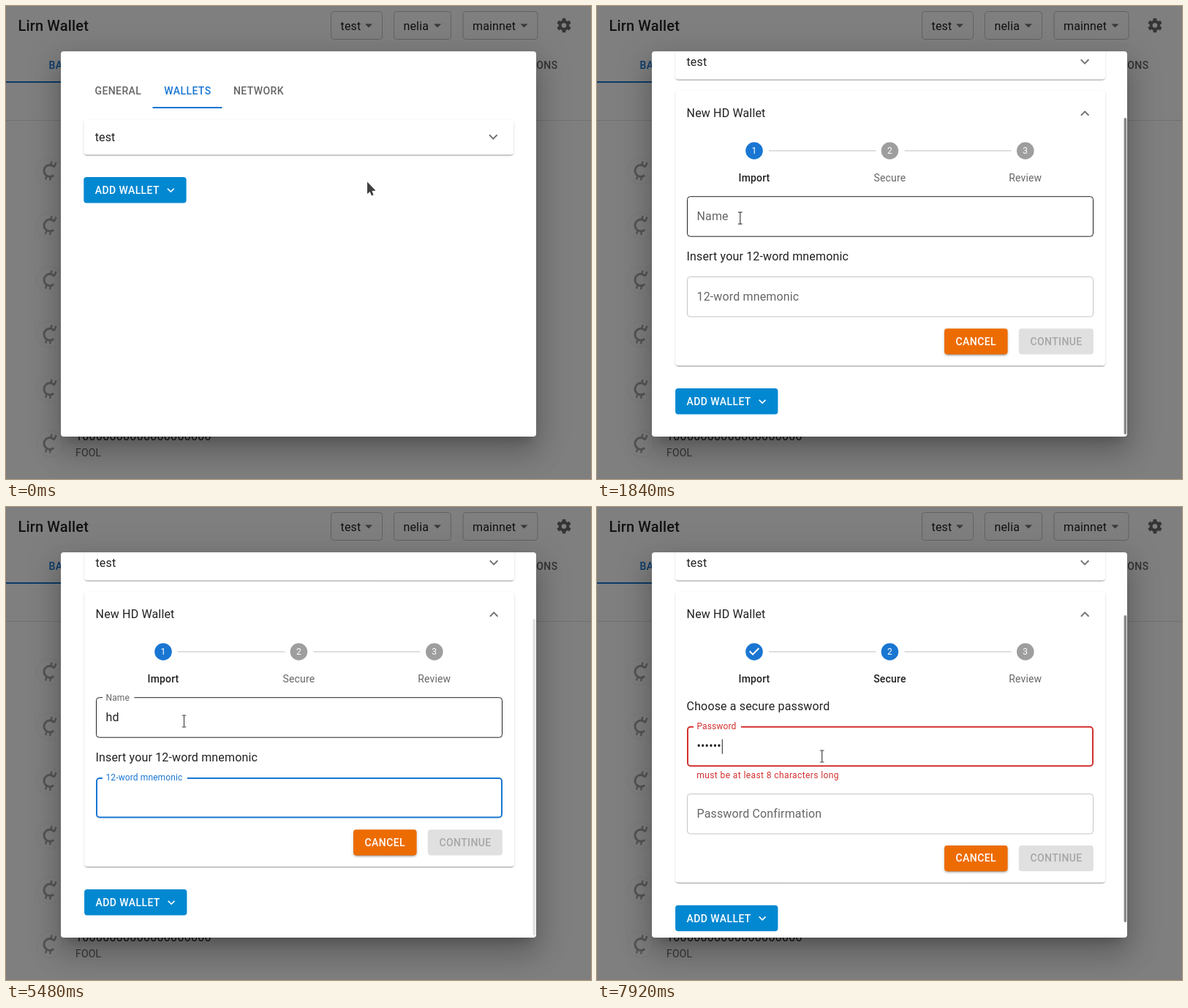
Write an HTML page that moves like this. It is 800 px wide and 647 px high and loops after 8000 ms.

```html
<!DOCTYPE html>
<html lang="en">
<head>
<meta charset="utf-8">
<title>Wallet settings</title>
<style>
html, body { margin: 0; width: 100%; height: 100%; overflow: hidden; background: #7f7f7f; }
svg { display: block; width: 100vw; height: 100vh; }
text { font-family: Roboto, sans-serif; white-space: pre; }
</style>
</head>
<body>
<svg id="stage" viewBox="0 0 800 647"></svg>
<script>
const NS = 'http://www.w3.org/2000/svg';
const LOOP = 8000;
const stage = document.getElementById('stage');
const INK = '#212121', GREY = '#666', BLUE = '#1976d2', RED = '#d32f2f';

// Building blocks
const set = (e, a) => { for (const k in a) e.setAttribute(k, a[k]); return e; };
const el = (p, tag, a = {}) => p.appendChild(set(document.createElementNS(NS, tag), a));
const group = (p, x = 0, y = 0) => el(p, 'g', { transform: `translate(${x} ${y})` });
const move = (e, x, y) => set(e, { transform: `translate(${x} ${y})` });
const show = (e, on) => set(e, { display: on ? 'inline' : 'none' });
const rect = (p, x, y, width, height, fill, rx = 0) => el(p, 'rect', { x, y, width, height, fill, rx });
const path = (p, d, fill, a = {}) => el(p, 'path', { d, fill, ...a });
function text(p, x, y, s, size = 16, fill = INK, a = {}) {
  const e = el(p, 'text', { x, y, fill, 'font-size': size, 'letter-spacing': 0.15, ...a });
  e.textContent = s;
  return e;
}
const caps = (p, x, y, s, fill, a = {}) =>
  text(p, x, y, s, 14, fill, { 'font-weight': 500, 'letter-spacing': 0.4, ...a });
function clip(id, x, y, w, h, r) {
  return rect(el(stage, 'clipPath', { id }), x, y, w, h, '#000', r);
}
const chevron = (p, x, y, fill, k = 1, turn = 0) =>
  path(p, 'M4.6-3.4 0 1.2-4.6-3.4-6-2 0 4 6-2z', fill, { transform: `translate(${x} ${y}) rotate(${turn}) scale(${k})` });

// Elevation layers: offset, blur, spread, opacity
const ELEV = {
  1: [[2, 1, -1, .2], [1, 1, 0, .14], [1, 3, 0, .12]],
  2: [[3, 1, -2, .2], [2, 2, 0, .14], [1, 5, 0, .12]],
  8: [[5, 5, -3, .2], [8, 10, 1, .14], [3, 14, 2, .12]],
  24: [[11, 15, -7, .2], [24, 38, 3, .14], [9, 46, 8, .12]]
};
function paper(p, x, y, w, h, level, fill = '#fff') {
  const g = group(p);
  const layers = ELEV[level].map(([dy, blur, s, o]) => {
    const e = rect(g, x - s, y + dy - s, w + 2 * s, h + 2 * s, '#000', 4);
    set(e, { opacity: o, style: `filter:blur(${blur / 2}px)` });
    return [e, 2 * s];
  });
  const face = rect(g, x, y, w, h, fill, 4);
  layers.push([face, 0]);
  return { g, face, layers, resize: n => layers.forEach(([e, s]) => set(e, { height: n + s })) };
}

// Timing
const clamp = v => Math.max(0, Math.min(1, v));
const ramp = (t, a, b) => clamp((t - a) / (b - a));
const smooth = (t, a, b) => { const u = ramp(t, a, b); return u * u * (3 - 2 * u); };
const out = (t, a, b) => 1 - (1 - ramp(t, a, b)) ** 3;
const mix = (a, b, u) => `rgb(${a.map((v, i) => Math.round(v + (b[i] - v) * u))})`;
const within = (t, ...spans) => spans.some(([a, b]) => t >= a && t < b);
const inside = ([x, y], [l, top, w, h]) => x >= l && x <= l + w && y >= top && y <= top + h;

// Dimmed page behind the dialog
const back = group(stage);
rect(back, 0, 0, 800, 647, '#7f7f7f');
text(back, 16.5, 33.5, 'Lirn Wallet', 20, '#111', { 'font-weight': 500 });
[['test', 444, 71], ['nelia', 530, 79], ['mainnet', 624.5, 103]].forEach(([s, x, w]) => {
  set(rect(back, x + .5, 7.5, w - 1, 38, 'none', 4), { stroke: '#626262' });
  text(back, x + 13.5, 32.5, s, 16, '#111');
  path(back, `M${x + w - 24} 24.5h10l-5 5z`, '#3a3a3a');
});
const gear = group(back, 763, 26.5);
el(gear, 'circle', { r: 5.3, fill: 'none', stroke: '#353535', 'stroke-width': 4 });
for (let i = 0; i < 6; i++) set(rect(gear, -2.4, -9.7, 4.8, 4, '#353535', .8), { transform: `rotate(${i * 60})` });
caps(back, 58.5, 86, 'BALANCES', '#0c3b69');
caps(back, 754.5, 86, 'CONNECTIONS', '#333', { 'text-anchor': 'end' });
rect(back, 0, 103, 160, 2, '#0c3b69');
rect(back, 0, 156, 800, 1, '#707070');
for (let i = 0; i < 6; i++) {
  const coin = group(back, 60, 225.5 + i * 74.6);
  el(coin, 'circle', { r: 18, fill: 'none', stroke: '#7a7a7a' });
  path(coin, 'M6.3-5A8 8 0 1 0 5.2 6', 'none', { stroke: '#555', 'stroke-width': 3 });
  path(coin, 'M2.5-13 1.3-8M8.5-11.5 6.3-6M-4.5 7-6 12M1.2 8 0 13', 'none', { stroke: '#555', 'stroke-width': 2.4 });
}
text(back, 95, 594, '1' + '0'.repeat(19), 16, '#111', { 'letter-spacing': .3 });
text(back, 95, 616, 'FOOL', 14, '#333');

// Dialog
clip('dialog', 75, 62, 650, 527, 4);
paper(stage, 75, 62, 650, 527, 24);
const view = el(stage, 'g', { 'clip-path': 'url(#dialog)' });
const page = group(view);
caps(page, 121.5, 120.5, 'GENERAL', GREY);
caps(page, 216.3, 120.5, 'WALLETS', BLUE);
caps(page, 311, 120.5, 'NETWORK', GREY);
rect(page, 200.5, 138, 95, 2, BLUE);
paper(page, 106.3, 155.5, 588, 48, 1);
text(page, 121.7, 184.5, 'test');
chevron(page, 666.3, 179, '#757575');

const add = group(page);
clip('add', 106.3, 234, 140.3, 35.5, 4);
const addFace = rect(add, 106.3, 234, 140.3, 35.5, '#0288d1', 4);
const ripple = el(el(add, 'g', { 'clip-path': 'url(#add)' }), 'circle', { cx: 205, cy: 253, fill: '#fff' });
caps(add, 121.8, 257, 'ADD WALLET', '#fff');
chevron(add, 225.3, 252, '#fff', 20 / 24);

// New wallet form
const form = group(page, -.8, 103);
const card = paper(form, 107.2, 116, 588, 376, 1);
const formClip = clip('form', 104, 116, 594, 376, 0);
const body = el(form, 'g', { 'clip-path': 'url(#form)' });
text(body, 122.6, 152, 'New HD Wallet');
chevron(body, 667.2, 147, '#757575', 1, 180);
rect(body, 235, 197.5, 146.5, 1, '#bdbdbd');
rect(body, 420.5, 197.5, 146, 1, '#bdbdbd');
const mid = { 'text-anchor': 'middle' };
const steps = ['Import', 'Secure', 'Review'].map((s, i) => {
  const g = group(body, 215 + i * 185.4, 198);
  return {
    dot: el(g, 'circle', { r: 11.8 }),
    num: text(g, 0, 4.3, i + 1, 12, '#fff', mid),
    tick: path(g, 'M-2 5-7 0-5.6-1.4-2 2.2 5.6-5.4 7-4z', '#fff'),
    name: text(g, 0, 42, s, 14, GREY, mid)
  };
});

function field(p, top, label) {
  const g = group(p, 123, top);
  const frame = rect(g, 0, 0, 556, 55.5, 'none', 4);
  const notch = rect(g, 9, -1, 0, 4, '#fff');
  const lab = text(g, 0, 0, label);
  const val = text(g, 13.5, 32.7, '');
  const caret = rect(g, 0, 18, 1, 20, INK);
  return (t, { from = Infinity, to = Infinity, value = '', hover, err, blink, dy = 0 }) => {
    const on = t >= from && t < to;
    const up = t >= from ? out(t, from, from + 200) : 0;
    const tone = err ? RED : BLUE;
    const line = on ? 2 : 1;
    move(g, 123, top + dy);
    set(frame, {
      x: line / 2, y: line / 2, width: 556 - line, height: 55.5 - line, 'stroke-width': line,
      stroke: on ? tone : hover ? INK : '#c4c4c4'
    });
    set(notch, { width: up ? (lab.getComputedTextLength() * .75 + 11) * up : 0 });
    set(lab, { fill: on ? tone : GREY, transform: `translate(13.5 ${32.7 - 28.4 * up}) scale(${1 - .25 * up})` });
    val.textContent = value;
    set(caret, { x: 14 + (value ? val.getComputedTextLength() + .5 : 0) });
    show(caret, blink);
  };
}

const first = group(body);
const nameField = field(first, 260.2, 'Name');
text(first, 122.6, 348, 'Insert your 12-word mnemonic');
const seedField = field(first, 370, '12-word mnemonic');

const second = group(body);
text(second, 122.6, 277.5, 'Choose a secure password');
const passField = field(second, 299.7, 'Password');
const hint = text(second, 136.3, 370.7, 'must be at least 8 characters long', 12, RED, { 'letter-spacing': .4 });
const againField = field(second, 370.3, 'Password Confirmation');

const actions = group(body);
const cancel = paper(actions, 475, 441.2, 86.6, 35.3, 2);
caps(actions, 518.3, 463.7, 'CANCEL', '#fff', mid);
const next = paper(actions, 576.8, 441.2, 102, 35.3, 2);
const nextText = caps(actions, 628, 463.7, 'CONTINUE', '#fff', mid);

const thumb = rect(view, 720.6, 63, 3.6, 433, '#888', 1.8);

// Drop-down menu
const menu = group(stage);
paper(menu, 106, 270, 130.5, 121, 8);
rect(menu, 106, 277.5, 130.5, 35.5, '#f4f4f4');
['HD Wallet', 'Json Keystore', 'Plaintext'].forEach((s, i) => text(menu, 121.7, 300 + i * 35.3, s));

// Pointer
const pointer = group(stage);
const edge = { stroke: '#fff', 'stroke-width': 1.4, 'paint-order': 'stroke', 'stroke-linejoin': 'round' };
const shapes = {
  arrow: path(pointer, 'M0 0V16.5L3.6 13.6 6 19 8.6 17.8 6.4 12.6 11.5 12z', '#404040', edge),
  hand: path(pointer, 'M-2 1C-2-1 1-1.3 1.7 .8L3 6C5 5 6 5.6 6.6 6.8 8 6.3 9 7 9.4 8 10.6 9.6 10.8 13 10 16V19L2 19.5C-1 17-5 13-6.8 10.6-6.8 8.8-5 8.2-3.8 9L-.2 11z', '#404040', edge),
  beam: path(pointer, 'M-2.8-8H2.8M-2.8 8H2.8M0-8V8', 'none', { stroke: '#444', 'stroke-width': 1.2 })
};
const TRACK = [
  [40, 494, 240.5], [840, 192, 251], [940, 205, 253], [1040, 205, 254], [1240, 203, 283], [1380, 192, 290],
  [1720, 192, 290], [2440, 243.5, 293], [5600, 243.5, 293], [6120, 547.5, 460.5], [6300, 622, 462],
  [6400, 630, 463.5], [6580, 630, 463.5], [7040, 383, 372], [7240, 307.7, 341]
];
function pointerAt(t) {
  const i = TRACK.findIndex(k => k[0] > t);
  if (i === 0) return TRACK[0].slice(1);
  if (i < 0) return TRACK[TRACK.length - 1].slice(1);
  const a = TRACK[i - 1], b = TRACK[i], u = smooth(t, a[0], b[0]);
  return [a[1] + (b[1] - a[1]) * u, a[2] + (b[2] - a[2]) * u];
}

const CLICK = { open: 1000, pick: 1420, name: 2560, tab: 4760, paste: 5600, next: 6520, pass: 7240 };
const TYPED = [7480, 7560, 7600, 7680, 7880, 7920];
const BOX = {
  add: [106, 234, 140, 36], menu: [106, 270, 130, 121],
  name: [123, 260, 556, 56], seed: [123, 370, 556, 56], pass: [123, 300, 556, 55],
  cancel: [475, 441, 87, 36], next: [577, 441, 102, 36]
};

function render(t) {
  const pos = pointerAt(t);
  const over = k => inside(pos, BOX[k]);
  const opened = t >= CLICK.pick;
  const secure = t >= CLICK.next;
  const err = t >= TYPED[0];
  const grow = err ? 21.7 : 0;
  const ready = t >= CLICK.paste && !secure;

  // Layout and scrolling
  const height = 48 + 328 * smooth(t, CLICK.pick, 1640) + grow;
  const scroll = smooth(t, 1460, 1680);
  move(page, opened ? .8 : 0, -103 * scroll);
  move(add, 0, opened ? height + 16 : 0);
  show(form, opened);
  card.resize(height);
  set(formClip, { height });
  const fade = ramp(t, 1440, 1560) * (1 - .75 * ramp(t, 4800, 5120) + .75 * ramp(t, 5600, 5720));
  set(thumb, { y: 63 + 90 * scroll - (err ? 5 : 0), height: err ? 420 : 433, opacity: fade });

  // Button and menu
  set(addFace, { fill: mix([2, 136, 209], [1, 87, 155], smooth(t, 600, 840) * (1 - smooth(t, 1000, 1200))) });
  set(ripple, { r: 102 * out(t, 940, 1620), opacity: .28 * (1 - smooth(t, 1000, 1550)) });
  const pop = out(t, CLICK.open, 1220);
  show(menu, within(t, [CLICK.open, 1620]));
  set(menu, {
    opacity: pop * (1 - ramp(t, CLICK.pick, 1620)),
    transform: `translate(106 270) scale(${.75 + .25 * pop} ${.56 + .44 * pop}) translate(-106 -270)`
  });

  // Stepper
  steps.forEach((s, i) => {
    const done = secure && i === 0;
    const lit = i === 0 || (secure && i === 1);
    set(s.dot, { fill: lit ? BLUE : '#9e9e9e' });
    set(s.name, { fill: lit ? INK : GREY, 'font-weight': lit ? 500 : 400 });
    show(s.num, !done);
    show(s.tick, done);
  });

  // Fields
  show(first, !secure);
  show(second, secure);
  if (!secure) {
    nameField(t, {
      from: CLICK.name, to: CLICK.tab, hover: over('name'),
      value: 'hd'.slice(0, (t >= 4520) + (t >= 4600)),
      blink: within(t, [CLICK.name, 3120], [3720, 4320], [4520, CLICK.tab])
    });
    seedField(t, {
      from: CLICK.tab, hover: over('seed'),
      value: t >= CLICK.paste ? 'test '.repeat(11) + 'junk' : '',
      blink: within(t, [4880, 5480], [CLICK.paste, 6240])
    });
  } else {
    passField(t, {
      from: CLICK.pass, hover: over('pass'), err, blink: t >= CLICK.pass,
      value: '•'.repeat(TYPED.filter(k => t >= k).length)
    });
    againField(t, { hover: over('seed') && !err, dy: grow });
  }
  show(hint, err);

  // Actions
  move(actions, 0, grow);
  set(cancel.face, { fill: over('cancel') ? '#e65100' : '#ed6c02' });
  set(next.face, { fill: !ready ? '#e0e0e0' : over('next') ? '#1565c0' : BLUE });
  set(nextText, { fill: ready ? '#fff' : '#a6a6a6' });
  next.layers.slice(0, 3).forEach(([e]) => show(e, ready));

  // Pointer shape follows what lies below
  let kind = 'arrow';
  if (t < 1620) {
    if (over('add') || (t >= CLICK.open && over('menu'))) kind = 'hand';
  } else if (over('cancel') || (ready && over('next'))) kind = 'hand';
  else if (over(secure ? 'pass' : 'name') || over('seed')) kind = 'beam';
  for (const k in shapes) show(shapes[k], k === kind);
  move(pointer, ...pos);
}

let start;
function tick(now) {
  start ??= now;
  render((now - start) % LOOP);
  requestAnimationFrame(tick);
}
render(0);
requestAnimationFrame(tick);
</script>
</body>
</html>
```
